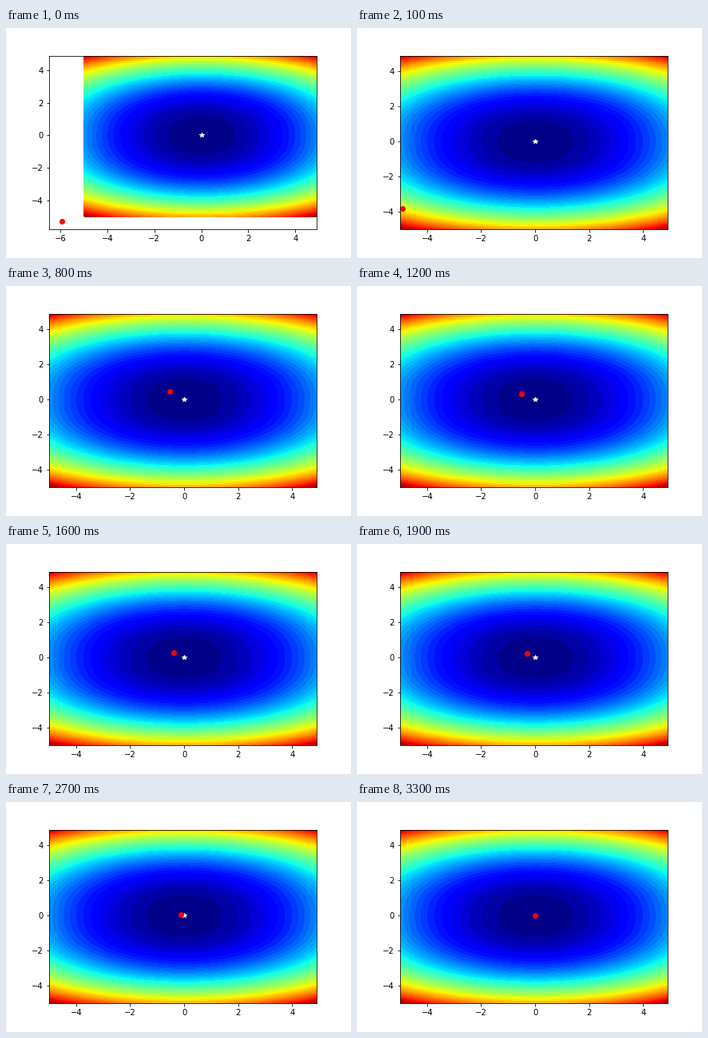
Animation of 432x288 px, one loop 3.7 s. Source, as a matplotlib script:

```python
import numpy as np
import matplotlib.pyplot as plt
from matplotlib.animation import FuncAnimation

FRAMES, INTERVAL = 37, 100
STALLS = (15, 28)  # steps in which no better point was found

# Key points of the search: step (stalls not counted), x, y
STEPS, XS, YS = np.transpose([
    (0, -5.93, -5.27), (1, -4.91, -3.83), (3, -2.20, -1.30),
    (6, -0.56, 0.46), (8, -0.535, 0.45), (12, -0.50, 0.32),
    (18, -0.30, 0.225), (22, -0.23, 0.13), (31, 0.0, 0.0),
])


def cost(x, y):
    return x**2 + 1.27 * np.abs(y)**2.47


def position(step):
    moves = step - sum(step >= s for s in STALLS)
    return np.interp(moves, STEPS, XS), np.interp(moves, STEPS, YS)


def limits(value, low=-5.0, high=4.9, margin=0.05):
    """Stay on the surface unless the particle lies below it."""
    if value >= low:
        return low, high
    return value - margin * (high - value), high


plt.rcParams["font.family"] = "DejaVu Sans"
fig, ax = plt.subplots(figsize=(6, 4), dpi=72, facecolor="white")
fig.subplots_adjust(left=0.125, right=0.9, bottom=0.125, top=0.88)

axis = -5 + 0.1 * np.arange(100)
X, Y = np.meshgrid(axis, axis)
ax.contourf(X, Y, cost(X, Y), 50, cmap="jet")
ax.plot(0, 0, "w*")
dot, = ax.plot([], [], "ro")


def update(step):
    x, y = position(step)
    dot.set_data([x], [y])
    ax.set_xlim(limits(x))
    ax.set_ylim(limits(y))
    return [dot]


anim = FuncAnimation(fig, update, frames=FRAMES, interval=INTERVAL,
                     init_func=lambda: update(0), repeat=True,
                     repeat_delay=0, blit=False)
plt.show()
```
